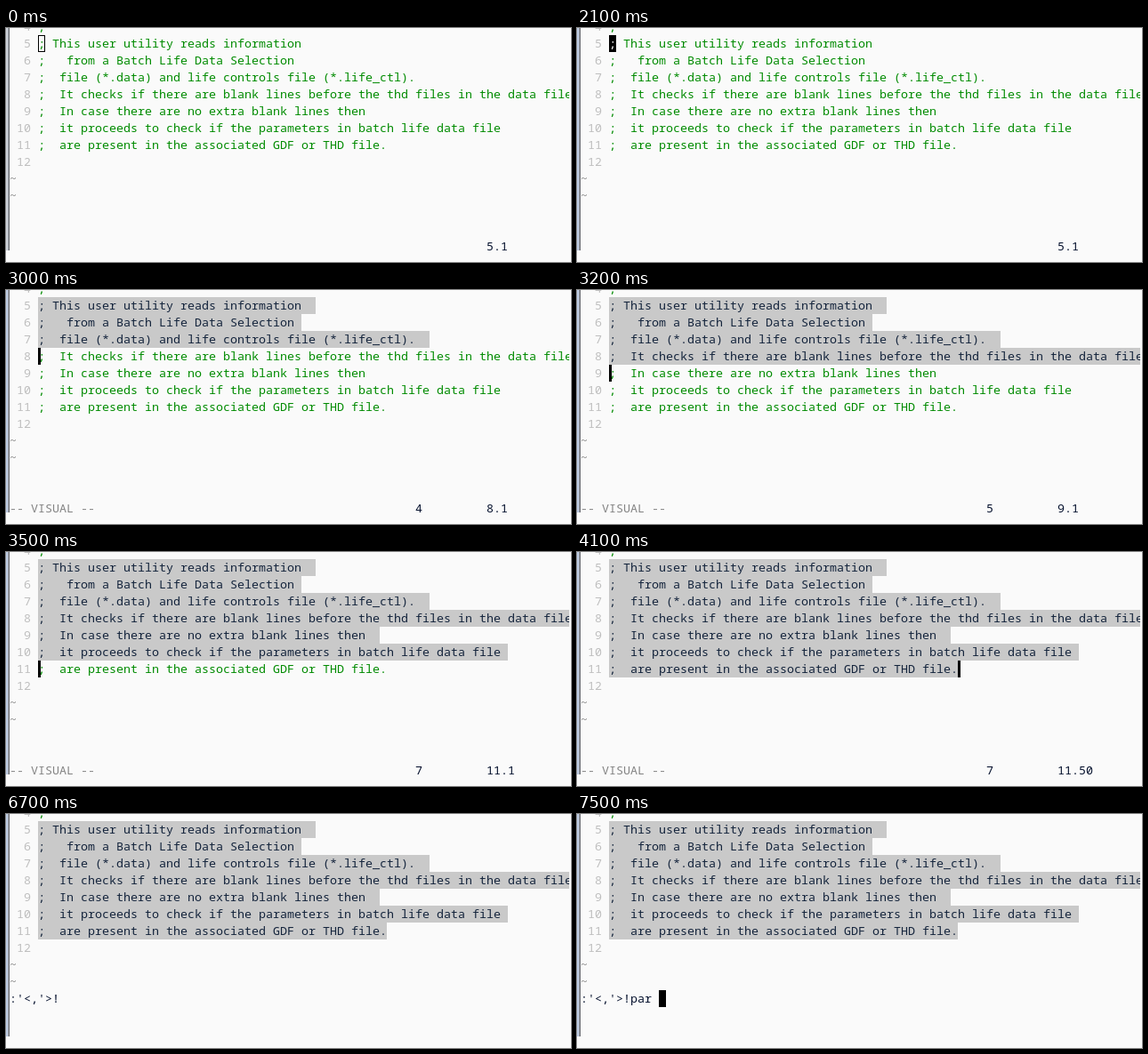
Animation of 635x263 px, one loop 8000 ms. Source, as an HTML page with a canvas:

```html
<!DOCTYPE html>
<html lang="en">
<head>
<meta charset="utf-8">
<title>Editor: visual line filter</title>
<style>
  html, body { margin: 0; width: 100%; height: 100%; overflow: hidden; background: #fafafa; }
  canvas { display: block; }
</style>
</head>
<body>
<canvas id="stage" width="635" height="263"></canvas>
<script>
const ctx = document.getElementById('stage').getContext('2d');
const LOOP = 8000, CW = 8, ROW = 19, TOP = 8, LEFT = 4, GUTTER = 36, RIGHT = 633;
const FIRST = 5, CMD_ROW = 10, STATUS_ROW = 12;
const BG = '#fafafa', GREEN = '#008b00', SEL = '#c9c9c9', SEL_INK = '#14243c',
      GREY = '#bfbfbf', DIM = '#858585', INK = '#06122e';

// Trailing blanks are part of the buffer and show up in the selection.
const lines = [
  '; This user utility reads information ',
  ';   from a Batch Life Data Selection',
  ';  file (*.data) and life controls file (*.life_ctl). ',
  ';  It checks if there are blank lines before the thd files in the data file',
  ';  In case there are no extra blank lines then ',
  ';  it proceeds to check if the parameters in batch life data file',
  ';  are present in the associated GDF or THD file.'
];

// [start time, changes to the editor state]
const steps = [
  [0, { line: 5, col: 1, cursor: 'hollow', mode: 'normal', cmd: '', focus: false }],
  [800, { col: 2, cursor: 'block', focus: true }],
  [1500, { cursor: '' }],
  [1700, { cursor: 'block' }],
  [2100, { col: 1 }],
  [2400, { mode: 'visual', cursor: 'bar' }],
  [2600, { line: 6 }],
  [2800, { line: 7 }],
  [3000, { line: 8 }],
  [3200, { line: 9 }],
  [3300, { line: 10 }],
  [3500, { line: 11 }],
  [4100, { col: 50 }],
  [4700, { cursor: '' }],
  [4900, { cursor: 'bar' }],
  [5300, { mode: 'command', cursor: '' }],
  [5400, { cmd: ":'<,'>" }],
  [5500, { cursor: 'block' }],
  [6200, { cursor: '' }],
  [6400, { cursor: 'block' }],
  [6700, { cmd: ":'<,'>!", cursor: '' }],
  [6800, { cursor: 'block' }],
  [7100, { cmd: ":'<,'>!p" }],
  [7200, { cmd: ":'<,'>!pa" }],
  [7300, { cmd: ":'<,'>!par" }],
  [7500, { cmd: ":'<,'>!par " }]
];

const stateAt = t => Object.assign({}, ...steps.filter(s => s[0] <= t).map(s => s[1]));

function rect(x, y, w, h, color) {
  ctx.fillStyle = color;
  ctx.fillRect(x, y, w, h);
}

function text(str, x, row, color) {
  ctx.fillStyle = color;
  [...str].forEach((ch, i) => {
    if (ch !== ' ') ctx.fillText(ch, x + i * CW, TOP + row * ROW + 14);
  });
}

function selectedCols(s, i) {
  const end = s.line - FIRST;
  if (s.mode === 'normal' || i > end) return 0;
  return i < end ? lines[i].length + 1 : s.col - 1;
}

function drawLine(s, i) {
  const n = selectedCols(s, i);
  rect(GUTTER, TOP + i * ROW, n * CW, ROW, SEL);
  text(lines[i].slice(0, n), GUTTER, i, SEL_INK);
  text(lines[i].slice(n), GUTTER + n * CW, i, GREEN);
}

function drawCursor(s) {
  const typing = s.mode === 'command';
  const row = typing ? CMD_ROW : s.line - FIRST;
  const x = typing ? LEFT + s.cmd.length * CW : GUTTER + (s.col - 1) * CW;
  const y = TOP + row * ROW;
  if (s.cursor === 'hollow') {
    ctx.strokeStyle = '#000';
    ctx.strokeRect(x + 0.5, y + 0.5, CW - 1, ROW - 1);
  } else if (s.cursor === 'bar') {
    rect(x, y, 3, ROW, '#000');
  } else if (s.cursor === 'block') {
    rect(x, y, CW, ROW, '#000');
    if (!typing) text(lines[row][s.col - 1], x, row, '#fff');
  }
}

function draw(t) {
  const s = stateAt(t);
  rect(0, 0, 635, 263, BG);
  ctx.font = '13.3333px "Noto Sans Mono", "DejaVu Sans Mono", monospace';
  ctx.lineWidth = 1;

  ctx.save();
  ctx.beginPath();
  ctx.rect(0, 0, RIGHT, 263);
  ctx.clip();
  text(';', GUTTER, -1, GREEN);
  lines.forEach((_, i) => drawLine(s, i));
  ctx.restore();

  for (let n = 4; n <= 12; n++) text(String(n).padStart(2), 12, n - FIRST, GREY);
  text('~', LEFT, 8, DIM);
  text('~', LEFT, 9, DIM);

  if (s.mode === 'visual') {
    text('-- VISUAL --', LEFT, STATUS_ROW, DIM);
    text(String(s.line - FIRST + 1), 460, STATUS_ROW, INK);
  }
  if (s.mode === 'command') text(s.cmd, LEFT, CMD_ROW, INK);
  else text(s.line + '.' + s.col, 540, STATUS_ROW, INK);
  drawCursor(s);

  // window frame
  rect(0, 0, 2, 250, s.focus ? '#bccbe2' : '#cdd2da');
  rect(2, 0, 1, 250, '#a4a8b0');
  rect(3, 0, 1, 250, '#62656b');
}

const began = performance.now();
function tick() {
  draw((performance.now() - began) % LOOP);
  requestAnimationFrame(tick);
}
tick();
</script>
</body>
</html>
```
